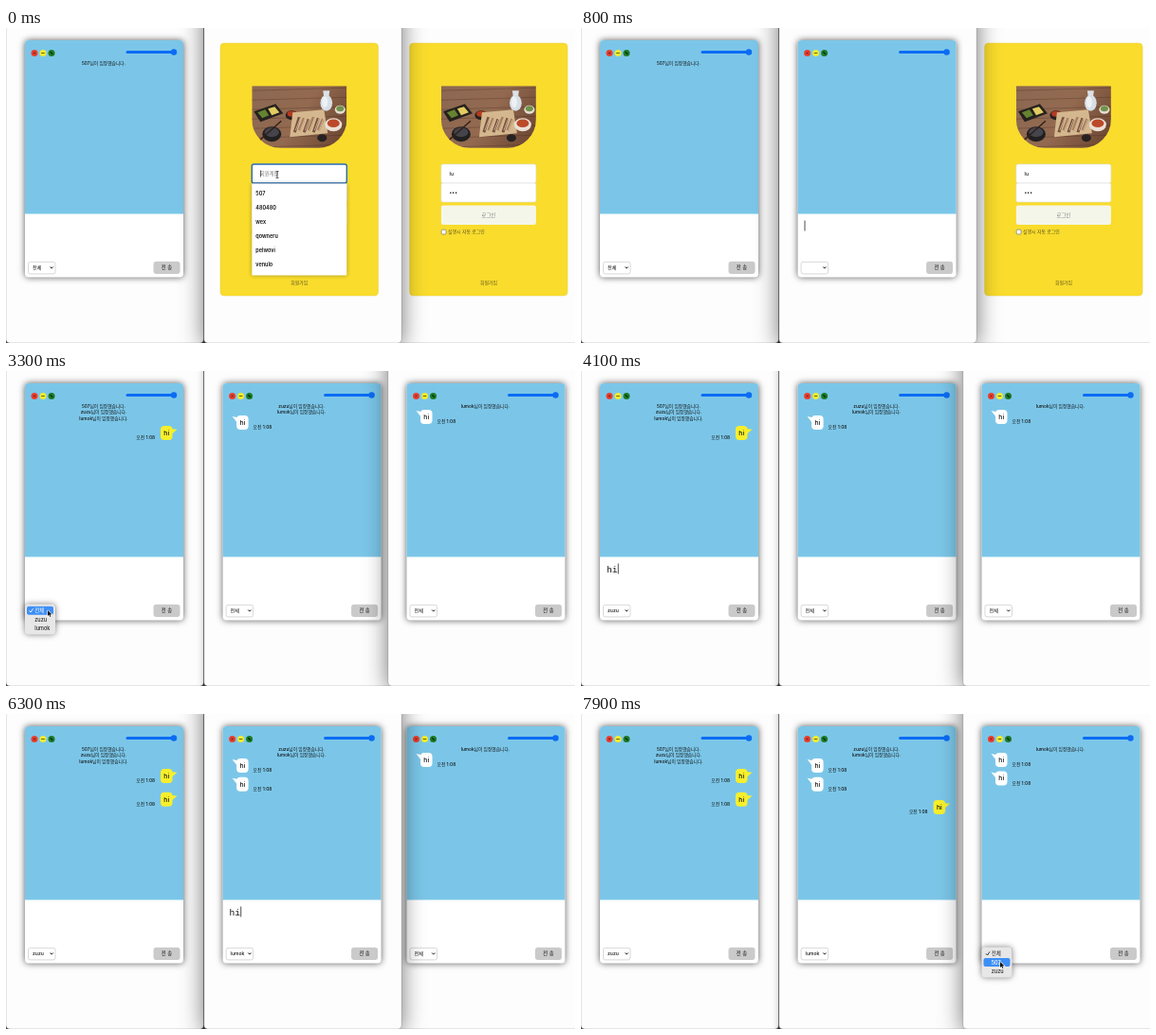
These frames come from a looping animation (600 px wide and 333 px high, 8000 ms). An HTML page with a canvas:

```html
<!DOCTYPE html>
<html lang="ko">
<head>
<meta charset="utf-8">
<title>Chat rooms</title>
<style>
html, body { margin: 0; width: 100%; height: 100%; overflow: hidden; background: #fdfdfd; }
canvas { display: block; width: 600px; height: 333px; }
</style>
</head>
<body>
<canvas id="stage" width="600" height="333"></canvas>
<script>
const ctx = document.getElementById('stage').getContext('2d');
const LOOP = 8000, STEP = 100;
const SANS = 'Inter, "Noto Sans CJK KR", "Noto Sans CJK", sans-serif';
const MONO = '"Liberation Mono", monospace';
const PAGE = '#fdfdfd', BLUE = '#0b6cf4', SKY = '#7bc6e8', YELLOW = '#f9dc2c';
const USERS = ['507', 'zuzu', 'lumok'];
const ALL = '전체';
const SAVED = ['507', '480480', 'wex', 'qowneru', 'pelwovi', 'venulo'];

// Pointer stops: time, x, y; a null position hides it until the next stop.
const POINTER = [
  [0, 286, 155], [100, 286, 155], [200, null],
  [900, 480, 158], [1000, 480, 158], [1100, null],
  [1600, 300, 220], [1700, 102, 216], [1900, 102, 216], [2000, null],
  [2700, 95, 225], [3000, 44, 253], [3400, 44, 253], [3600, 40, 262],
  [3800, 90, 215], [3900, null],
  [4400, 190, 230], [4600, 290, 215], [4800, 253, 253], [5100, 253, 253],
  [5400, 248, 271], [5700, 248, 271], [5900, 280, 215], [6000, null],
  [6700, 330, 230], [7000, 480, 215], [7300, 446, 253], [7600, 443, 254],
  [7800, 442, 262], [8000, 442, 262]
];

let t = 0;
const within = (from, to) => t >= from && t < to;
const typed = (word, start) => word.slice(0, Math.max(0, Math.floor((t - start) / STEP) + 1));

function box(x, y, w, h, r, fill, stroke, line = 1) {
  ctx.beginPath();
  ctx.roundRect(x, y, w, h, r);
  if (fill) { ctx.fillStyle = fill; ctx.fill(); }
  if (stroke) { ctx.strokeStyle = stroke; ctx.lineWidth = line; ctx.stroke(); }
}

function disc(x, y, r, fill, ry = r) {
  ctx.beginPath();
  ctx.ellipse(x, y, r, ry, 0, 0, Math.PI * 2);
  ctx.fillStyle = fill;
  ctx.fill();
}

function path(points, fill, stroke, line = 1) {
  ctx.beginPath();
  points.forEach(([x, y], i) => i ? ctx.lineTo(x, y) : ctx.moveTo(x, y));
  if (fill) { ctx.closePath(); ctx.fillStyle = fill; ctx.fill(); }
  if (stroke) { ctx.strokeStyle = stroke; ctx.lineWidth = line; ctx.stroke(); }
}

function label(text, x, y, { size = 5, weight = 500, color = '#111', align = 'left', family = SANS } = {}) {
  ctx.font = `${weight} ${size}px ${family}`;
  ctx.textAlign = align;
  ctx.textBaseline = 'alphabetic';
  ctx.fillStyle = color;
  ctx.fillText(text, x, y + size * 0.36);
}

function shaded(color, blur, draw) {
  ctx.save();
  ctx.shadowColor = color;
  ctx.shadowBlur = blur;
  draw();
  ctx.restore();
}

function browser(x, w, top, content) {
  shaded(`rgba(0,0,0,${top ? 0.55 : 0.25})`, top ? 24 : 8, () => {
    ctx.shadowOffsetY = 4;
    box(x, -30, w, 363, 4, PAGE);
  });
  box(x, -30, w, 363, 4, null, 'rgba(0,0,0,.28)', 0.7);
  ctx.save();
  ctx.beginPath();
  ctx.roundRect(x, -30, w, 363, 4);
  ctx.clip();
  content(x);
  ctx.restore();
}

function controls() {
  const lights = [['#e9402f', 30], ['#f3ec2b', 39], ['#1d7a26', 48]];
  for (const [color, x] of lights) disc(x, 26.5, 3.5, color);
  path([[28.9, 25.4], [31.1, 27.6]], null, '#711', 0.9);
  path([[31.1, 25.4], [28.9, 27.6]], null, '#711', 0.9);
  path([[37.2, 26.5], [40.8, 26.5]], null, '#6b6612', 1.1);
  path([[46.7, 25.2], [49.3, 27.8]], null, '#052f0b', 1.3);
  box(126.5, 24, 52, 3, 1.5, BLUE);
  disc(177, 25.5, 3.2, BLUE);
}

function bubble(mine, y) {
  const x = mine ? 163 : 34.5;
  const fill = mine ? '#f7ef2b' : '#fff';
  box(x, y, 12.5, 15, 4, fill);
  path(mine
    ? [[x + 10, y + 3], [x + 17.5, y + 3.8], [x + 11.5, y + 9]]
    : [[x + 2.5, y + 2.5], [x - 4.5, y + 1], [x + 1, y + 8]], fill);
  label('hi', x + 6.2, y + 7.5, { size: 6.8, align: 'center' });
  label('오전 1:08', mine ? 157 : 52, y + 12.6, { size: 4.8, align: mine ? 'right' : 'left' });
}

function menu(options, checked, hover) {
  shaded('rgba(0,0,0,.5)', 6, () => box(20, 246.5, 32, 32, 4, '#e7e7e8'));
  options.forEach((option, i) => {
    const y = 253.3 + i * 9.3, lit = i === hover;
    if (lit) box(22, y - 4.5, 28, 9, 2, '#3d8ff6');
    const color = lit ? '#fff' : '#222';
    if (option === checked) path([[24.5, y], [26, y + 1.7], [28.5, y - 2]], null, color, 0.9);
    label(option, 30.3, y, { size: 5.5, color });
  });
}

function chat(dx, room) {
  ctx.save();
  ctx.translate(dx, 0);
  shaded('rgba(0,0,0,.65)', 7, () => box(20, 13, 167, 250.5, 4, '#fff'));
  box(20, 13, 167, 183.5, [4, 4, 0, 0], SKY);
  controls();

  room.joined.forEach((user, i) =>
    label(`${user}님이 입장했습니다.`, 103, 37.5 + i * 6.2, { size: 4.75, align: 'center' }));
  let y = 34.7 + room.joined.length * 6.2;
  for (const mine of room.messages) {
    bubble(mine, mine ? y + 4.7 : y);
    y += mine ? 24.7 : 19.6;
  }

  if (room.draft) label(room.draft, 27, 210, { size: 9.6, weight: 400, family: MONO });
  if (room.caret) {
    ctx.fillStyle = '#222';
    ctx.fillRect(27 + room.draft.length * 5.9, 203.5, 0.8, 11);
  }

  box(23.5, 247.3, 28.5, 12.6, 2, '#fff', '#cfcfcf', 0.8);
  ctx.save();
  ctx.beginPath();
  ctx.rect(24, 247, 20.5, 13);
  ctx.clip();
  label(room.choice, 28, 253.5, { size: 5.1 });
  ctx.restore();
  path([[46.7, 252.5], [48.2, 254.1], [49.7, 252.5]], null, '#111', 1);
  box(155.5, 246.7, 28, 13.3, 3, '#cacaca');
  label('전 송', 169.5, 253.3, { size: 5.4, align: 'center' });
  if (room.menu) menu(...room.menu);
  ctx.restore();
}

function dinner(x, y) {
  ctx.save();
  ctx.beginPath();
  ctx.roundRect(x, y, 100, 65.5, [0, 0, 30, 30]);
  ctx.clip();
  ctx.translate(x, y);
  const wood = ctx.createLinearGradient(0, 0, 100, 65);
  wood.addColorStop(0, '#8c6852');
  wood.addColorStop(0.5, '#936a50');
  wood.addColorStop(1, '#68422f');
  ctx.fillStyle = wood;
  ctx.fillRect(0, 0, 100, 66);
  for (let i = 0; i < 7; i++) path([[0, 5 + i * 10], [100, 2 + i * 10]], null, 'rgba(60,32,22,.35)', 0.8);

  path([[2, 27], [25, 19], [33, 29], [9, 38]], '#25211e');
  path([[6, 28], [14, 25], [18, 31], [11, 34]], '#658330');
  path([[17, 24], [24, 22], [29, 28], [21, 31]], '#e2cb62');
  disc(42, 31, 6.5, '#29211e', 5);
  disc(42, 29.5, 4.8, '#b33a21', 3);
  disc(21, 51, 10, '#211f20', 8);
  disc(21, 49, 7.5, '#45444a', 5);
  path([[3, 62], [31, 37]], null, '#30201b', 1.5);
  path([[43, 28], [76, 25], [80, 50], [40, 54]], '#d4b78e');
  for (let i = 0; i < 6; i++) {
    const rib = 45 + i * 5;
    path([[rib, 49 - i % 2 * 2], [rib + 5, 33 + i % 3]], null, i % 2 ? '#a57d5e' : '#755140', 3);
    path([[rib + 1, 47], [rib + 6, 34]], null, '#e1c3a0', 0.8);
  }
  path([[75, 5], [82, 5], [81, 12], [76, 12]], '#dce2e7');
  disc(78.5, 18, 6.3, '#d7dfe6', 8.5);
  disc(77, 17, 3, '#edf1f4', 6);
  disc(93, 25, 5.5, '#e6dfd5', 4.5);
  disc(93, 24, 4, '#70934b', 3);
  disc(86, 41, 9, '#eae0d5', 7);
  disc(86, 39.5, 6.5, '#bc4a2a', 4.3);
  disc(74, 55, 5, '#262221', 4);
  ctx.restore();
}

function login(x, form) {
  ctx.save();
  ctx.translate(x, 0);
  box(0, 16, 166.5, 267, 4, YELLOW, '#e7cf43', 0.5);
  dinner(33.3, 61.2);
  box(33.3, 144, 100, 20, 2, '#fff', '#d9dde3', 0.6);
  box(33.3, 164, 100, 20, 2, '#fff', '#d9dde3', 0.6);
  if (form.focus !== undefined) box(33.3, 144 + form.focus * 20, 100, 20, 2, '#fff', '#276bb0', 1.4);
  label(form.id || '회원계정', 42, 154.2, { size: 5.2, color: form.id ? '#111' : '#777' });
  label(form.pass ? '•'.repeat(form.pass) : '비밀번호', 42, 174.2, { size: 5.2, color: form.pass ? '#111' : '#777' });
  if (form.caret !== undefined) {
    ctx.fillStyle = '#222';
    ctx.fillRect(42 + form.caret, 150.5, 0.7, 7);
  }
  box(33.3, 187.5, 100, 20.5, 2, '#f5f6ea');
  label('로그인', 83.3, 197.6, { size: 5.3, color: '#777', align: 'center' });
  box(33.6, 213.2, 4.8, 4.8, 1, '#fff', '#777', 0.7);
  label('실행시 자동 로그인', 40.5, 215.7, { size: 4.9, color: '#5d5522' });
  label('회원가입', 83.3, 269.2, { size: 4.9, color: '#5d5522', align: 'center' });
  if (form.list) {
    shaded('rgba(0,0,0,.35)', 4, () => box(33.3, 164.5, 100, 97, 1, '#fff'));
    SAVED.forEach((name, i) => label(name, 37.3, 175.2 + i * 15, { size: 5.5, weight: 600 }));
  }
  ctx.restore();
}

function leftPage() {
  const draft = within(2000, 2300) ? typed('hi', 2000) : within(4000, 4300) ? typed('hi', 4000) : '';
  chat(0, {
    joined: USERS.slice(0, t < 900 ? 1 : t < 1600 ? 2 : 3),
    messages: [2300, 4300].filter(ms => t >= ms).map(() => true),
    choice: t < 3700 ? ALL : USERS[1],
    draft,
    caret: within(1900, 2500) || within(3900, 4500),
    menu: within(3000, 3700) && [[ALL, USERS[1], USERS[2]], ALL, t < 3500 ? 0 : 1]
  });
}

function middlePage() {
  if (t < 700) {
    login(226, {
      id: typed(USERS[1], 100),
      pass: t < 400 ? 0 : Math.min(3, (t - 300) / STEP),
      focus: t < 400 ? 0 : 1,
      caret: t < 100 ? 0 : undefined,
      list: t < 200
    });
    return;
  }
  const messages = [[2300, false], [4300, false], [6500, true]];
  chat(208.6, {
    joined: t < 900 ? [] : USERS.slice(1, t < 1600 ? 2 : 3),
    messages: messages.filter(([ms]) => t >= ms).map(([, mine]) => mine),
    choice: t < 900 ? '' : t < 5500 ? ALL : USERS[2],
    draft: within(6000, 6500) ? typed('hi', 6000) : '',
    caret: within(700, 1000) || within(4600, 5000) || within(5900, 6800),
    menu: within(5000, 5500) && [[ALL, USERS[0], USERS[2]], ALL, t < 5200 ? 0 : t < 5300 ? 1 : 2]
  });
}

function rightPage() {
  if (t < 1500) {
    login(425.6, {
      id: t < 1100 ? USERS[2].slice(0, 2) : USERS[2].slice(0, 2) + typed(USERS[2].slice(2), 1100),
      pass: 3,
      focus: t < 1000 ? undefined : 0
    });
    return;
  }
  chat(402.5, {
    joined: t < 1600 ? [] : [USERS[2]],
    messages: [2300, 6500].filter(ms => t >= ms).map(() => false),
    choice: t < 1600 ? '' : ALL,
    draft: '',
    caret: within(1500, 1900) || within(7000, 7300),
    menu: t >= 7400 && [[ALL, USERS[0], USERS[1]], ALL, t < 7700 ? 0 : 1]
  });
}

function pointer() {
  const i = POINTER.findLastIndex(stop => stop[0] <= t);
  const [start, x, y] = POINTER[i];
  if (x === null) return;
  const [end, nx, ny] = POINTER[i + 1] || POINTER[i];
  const k = nx === null || end === start ? 0 : (t - start) / (end - start);
  ctx.save();
  ctx.translate(x + ((nx ?? x) - x) * k, y + ((ny ?? y) - y) * k);
  if (t < 200) {
    path([[0, -3], [0, 3]], null, '#222', 0.8);
    path([[-1.5, -3.5], [1.5, -3.5]], null, '#222', 0.7);
    path([[-1.5, 3.5], [1.5, 3.5]], null, '#222', 0.7);
  } else {
    const arrow = [[0, 0], [0, 6], [1.4, 4.8], [2.4, 7], [3.4, 6.5], [2.4, 4.4], [4.3, 4.3], [0, 0]];
    path(arrow, null, '#fff', 1.2);
    path(arrow, '#111');
  }
  ctx.restore();
}

function render(now) {
  t = Math.floor(now % LOOP / STEP) * STEP;
  ctx.fillStyle = '#3b4247';
  ctx.fillRect(0, 0, 600, 333);
  const rightOnTop = within(1000, 4600) || t >= 7000;
  const middle = () => browser(208.8, 208.4, !rightOnTop, middlePage);
  const right = () => browser(402.8, 208.4, rightOnTop, rightPage);
  browser(0, 208.4, false, leftPage);
  if (rightOnTop) { middle(); right(); } else { right(); middle(); }
  pointer();
}

const began = performance.now();
function tick() {
  render(performance.now() - began);
  requestAnimationFrame(tick);
}
tick();
</script>
</body>
</html>
```
